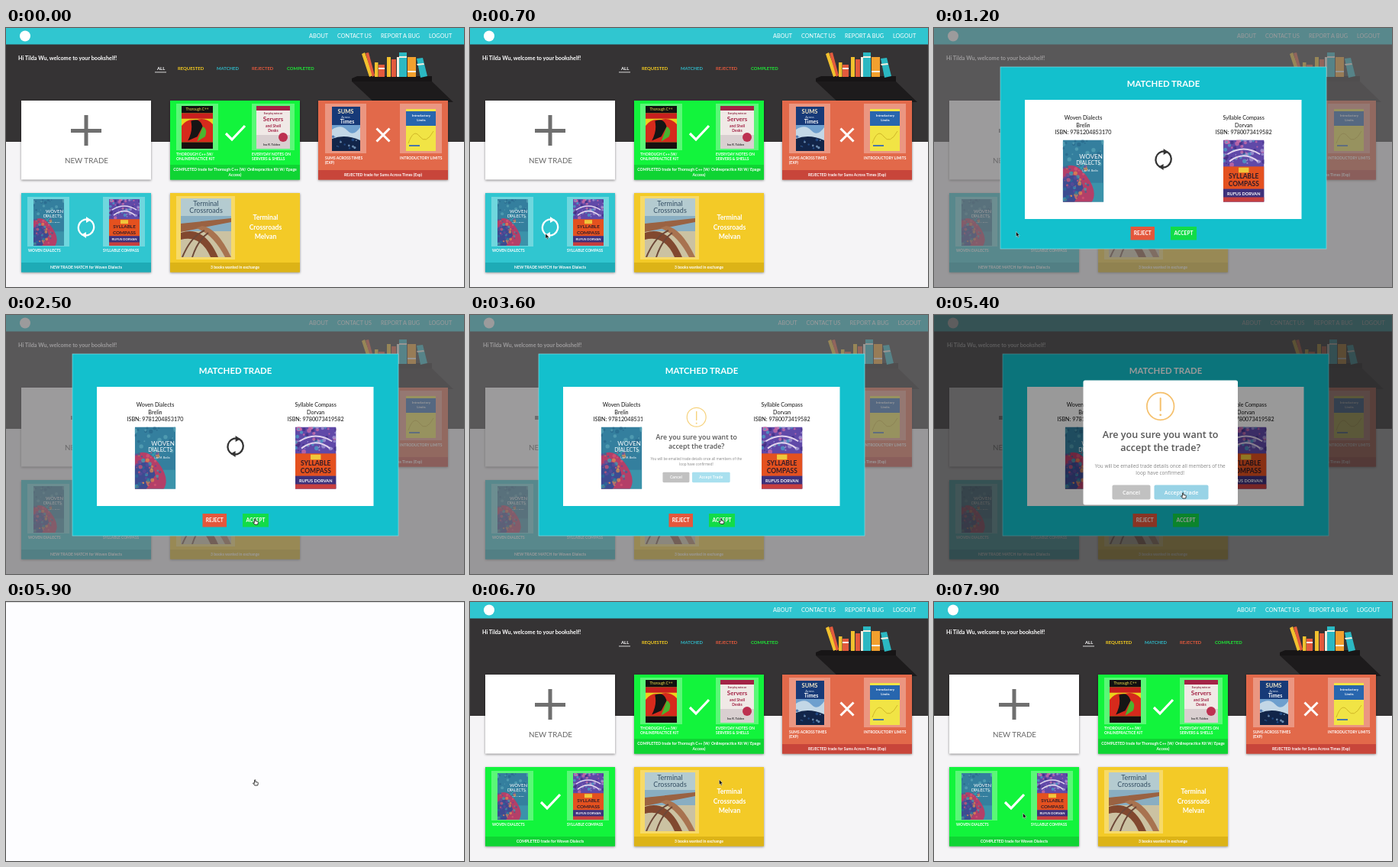
These frames come from a looping animation (600 by 339 pixels, 8000 ms). An HTML page:

```html
<!DOCTYPE html>
<html lang="en">
<head>
<meta charset="utf-8">
<title>Bookshelf trades</title>
<style>
html, body { margin: 0; height: 100%; overflow: hidden; background: #fdfdff; }
svg { display: block; width: 100vw; height: 100vh; }
text { font-family: Lato, "Open Sans", sans-serif; fill: #fff; white-space: pre; }
.b { font-weight: 700; }
.m { text-anchor: middle; }
.os { font-family: "Open Sans", "Noto Sans", sans-serif; }
.semi { font-weight: 600; }
.card { filter: drop-shadow(0 1px 1.5px rgba(0, 0, 0, .45)); }
</style>
</head>
<body>
<svg id="stage" viewBox="0 0 600 339"></svg>
<script>
const LOOP = 8000, STEP = 100;
const TEAL = '#30c6d0', GREEN = '#12f43c', RED = '#e2694a', YELLOW = '#f3ca27';

const rect = (x, y, w, h, fill, more = '') =>
  `<rect x="${x}" y="${y}" width="${w}" height="${h}" fill="${fill}" ${more}/>`;
const text = (x, y, size, str, cls = '', fill = '#fff') =>
  `<text x="${x}" y="${y}" font-size="${size}" class="${cls}" style="fill:${fill}">${str}</text>`;
const path = (d, fill, stroke = 'none', width = 1) =>
  `<path d="${d}" fill="${fill}" stroke="${stroke}" stroke-width="${width}"/>`;
const poly = (points, fill) => `<polygon points="${points}" fill="${fill}"/>`;
const group = (id, body) => `<g id="${id}">${body}</g>`;
const at = (x, y, body) => `<g transform="translate(${x} ${y})">${body}</g>`;

// Seeded speckle used to texture the covers
function specks(seed, n, colors, w, y0, y1, size) {
  let out = '';
  const rnd = () => (seed = seed * 16807 % 2147483647) / 2147483647;
  for (let i = 0; i < n; i++) {
    const r = size * (.4 + rnd());
    out += `<circle cx="${(rnd() * w).toFixed(1)}" cy="${(y0 + rnd() * (y1 - y0)).toFixed(1)}" r="${r.toFixed(1)}" fill="${colors[i % colors.length]}" opacity=".7"/>`;
  }
  return out;
}

const symbol = (id, w, h, body) =>
  `<symbol id="${id}" viewBox="0 0 ${w} ${h}" preserveAspectRatio="xMidYMid slice">${body}</symbol>`;
const cover = (id, x, y, w, h) => `<use href="#${id}" x="${x}" y="${y}" width="${w}" height="${h}"/>`;

const covers =
  symbol('cpp', 40, 56, rect(0, 0, 40, 56, '#e9d21c') + rect(0, 0, 40, 10, '#111') +
    text(20, 7, 4.6, 'Thorough C++', 'm', '#f3e14a') + rect(0, 10, 40, 7, '#c81f1f') +
    path('M0 26Q8 16 18 19Q30 14 40 24V47H0Z', '#d62a1c') +
    path('M12 20Q23 15 27 27L20 40 8 45Q15 32 12 20Z', '#151515') +
    path('M27 27Q34 30 30 40L20 46Z', '#49b52f') + rect(0, 47, 40, 9, '#181010')) +
  symbol('servers', 44, 56, rect(0, 0, 44, 56, '#f0e9e6') + rect(0, 0, 44, 6, '#a32346') +
    text(22, 10.5, 3, 'Everyday notes on', 'm b', '#8d2440') + text(22, 20, 8, 'Servers', 'm b', '#a32346') +
    text(22, 28, 5, 'and Shell', 'm b', '#a32346') + text(22, 34, 5, 'Desks', 'm b', '#a32346') +
    rect(0, 38, 44, 18, '#d9cfd0') + `<circle cx="35" cy="41" r="6" fill="#bd3050"/>` +
    text(20, 52, 4, 'Ivo R. Talden', 'm b', '#333')) +
  symbol('sums', 37, 58, rect(0, 0, 37, 58, '#173a78') + rect(0, 24, 37, 14, '#6e9fce') +
    path('M0 30Q12 22 20 31T37 27V45H0Z', '#c3d7e6') + path('M0 42Q17 35 37 44V58H0Z', '#122549') +
    text(18, 9, 7.5, 'SUMS', 'm b', '#f4e7c4') + text(18, 15, 4, 'Across', 'm', '#dce6f2') +
    text(20, 22, 7, 'Times', 'm b') + specks(9, 14, ['#91b6d8', '#28579a'], 37, 38, 55, 1.5)) +
  symbol('limits', 39, 55, rect(0, 0, 39, 55, '#f1e445') + rect(0, 3, 39, 19, '#2866ae') +
    text(20, 10, 4.3, 'Introductory', 'm b') + text(20, 16, 4.3, 'Limits', 'm b') +
    path('M3 45Q10 25 18 36T36 29', 'none', '#d0b727', 1) + rect(4, 47, 14, 2, '#4a78a8')) +
  symbol('woven', 40, 60.5, rect(0, 0, 40, 61, '#347f9e') + rect(0, 42, 40, 19, '#3b93aa') +
    path('M0 28Q11 19 23 35T28 61H0Z', '#b43f68') + path('M0 38Q16 28 20 47L11 61H0Z', '#3d4b91') +
    specks(31, 60, ['#d75876', '#35a7b5', '#5f4a9b', '#e6904d', '#286e9b'], 25, 25, 60, 1.5) +
    specks(55, 25, ['#5aa5b8', '#29678b'], 40, 0, 25, 1.7) +
    text(16, 18, 6, 'WOVEN') + text(13, 24, 5.2, 'DIALECTS') +
    text(19, 31, 2.6, 'Lise M. Brelin')) +
  symbol('compass', 40, 60.5, rect(0, 0, 40, 61, '#6049a8') +
    specks(17, 65, ['#a9a0d9', '#3e2d82', '#d46da5', '#49a5c9'], 40, 0, 25, 1.6) +
    path('M4 14Q20 4 36 14M6 21Q20 10 34 21', 'none', '#e3d4ee', 1.5) +
    rect(0, 26, 40, 22, '#e4511f') + rect(15, 27, 10, 5, '#f0c63b') +
    text(20, 38, 6.3, 'SYLLABLE', 'm b', '#301b28') + text(20, 45.5, 6.3, 'COMPASS', 'm b', '#301b28') +
    rect(0, 48, 40, 12.5, '#3d317b') + text(20, 54, 4.2, 'RUFUS DORVAN', 'm b') +
    rect(0, 56, 40, 5, '#c63f3f')) +
  symbol('cross', 66, 77, rect(0, 0, 66, 77, '#d5dfda') + rect(0, 0, 66, 23, '#b4cbd0') +
    text(33, 10, 9, 'Terminal', 'm', '#344e63') + text(33, 19, 9, 'Crossroads', 'm', '#344e63') +
    rect(0, 23, 66, 20, '#89aec2') + rect(0, 43, 66, 34, '#cbc2a2') +
    path('M0 33L66 26V31L0 44Z', '#9a6242') + path('M0 45Q31 35 49 77H39Q26 47 0 54Z', '#81482f') +
    path('M20 39Q42 46 58 77H66Q48 39 28 36Z', '#a87350') +
    path('M2 77Q13 50 31 42M15 77Q22 55 36 45', 'none', '#6d4838', 2));

const check = path('M-12 1L-4 9 13-9', 'none', '#fff', 3.2);
const cross = path('M-8.5-8.5L8.5 8.5M8.5-8.5L-8.5 8.5', 'none', '#fff', 3);
const halfSync = c => path('M-4.5 10A11 11 0 0 1 1.5-10.6', 'none', c, 2.3) + poly('0,-14 6.5,-9.8 0,-6', c);
const sync = c => halfSync(c) + `<g transform="rotate(180)">${halfSync(c)}</g>`;

function card(x, y, color, bar, lines, body) {
  const barH = lines.length > 1 ? 19.5 : 12.5;
  return at(x, y, `<g class="card">${rect(0, 0, 170, 103.5, color)}</g>` +
    (lines.length ? rect(0, 103.5 - barH, 170, barH, bar) : '') + body +
    lines.map((s, i) => text(85, 103.5 - barH + 8 + i * 7.3, 5.1, s, 'm b')).join(''));
}
const caption = (x, y, lines) => lines.map((s, i) => text(x, y + i * 6.2, 4.9, s, 'b')).join('');
const frame = (x, y, w, h) => rect(x, y, w, h, '#fff', 'opacity=".3"');

const tradeBody = icon => frame(8, 5, 55, 65) + cover('woven', 16, 8, 40, 61) +
  frame(107, 5, 55, 65) + cover('compass', 115, 8, 40, 61) +
  caption(9, 77, ['WOVEN DIALECTS']) + caption(107, 77, ['SYLLABLE COMPASS']) + at(85, 45, icon);

const cards =
  card(20, 95, '#fff', '', [], rect(65, 37, 40, 5, '#6f6f6f') + rect(82.5, 19, 5, 40, '#6f6f6f') +
    text(85.5, 82, 9.8, 'NEW TRADE', 'm', '#666')) +
  card(215, 95, GREEN, '#0fd433', ['COMPLETED trade for Thorough C++ (W/ Onlinepractice Kit W/ Epage', 'Access)'],
    frame(8, 4, 55, 61) + cover('cpp', 15, 7, 41, 56) + frame(107, 4, 56, 61) + cover('servers', 113, 7, 44, 56) +
    caption(8, 71.5, ['THOROUGH C++ (W/', 'ONLINEPRACTICE KIT']) +
    caption(107, 71.5, ['EVERYDAY NOTES ON', 'SERVERS &amp; SHELLS']) + at(85, 42, check)) +
  card(409, 95, RED, '#c8453a', ['REJECTED trade for Sums Across Times (Exp)'],
    frame(9, 4, 54, 65) + cover('sums', 18, 8, 37, 58) + frame(107, 4, 55, 65) + cover('limits', 115, 11, 39, 55) +
    caption(9, 77, ['SUMS ACROSS TIMES', '(EXP)']) + caption(107, 77, ['INTRODUCTORY LIMITS']) + at(85, 45, cross)) +
  group('matched', card(20, 216, TEAL, '#1eabb6', ['NEW TRADE MATCH for Woven Dialects'], tradeBody(sync('#fff')))) +
  group('completed', card(20, 216, GREEN, '#0fd433', ['COMPLETED trade for Woven Dialects'], tradeBody(check))) +
  card(215, 216, YELLOW, '#dcb317', ['3 books wanted in exchange'],
    frame(8, 4, 77, 83) + cover('cross', 14, 7, 66, 77) +
    ['Terminal', 'Crossroads', 'Melvan'].map((s, i) => text(125, 35 + i * 12.7, 8.7, s, 'm b')).join(''));

const shelf = poly('453,70 558,70 586,97 482,97', '#1d1b1c') + poly('453,66 460,63 558,63 558,70 453,70', '#171516') +
  poly('466,34 470,32 481,62 476,64', '#f2c12e') + poly('471,33 475,32 483,62 480,64', '#e35a3d') +
  rect(483, 45, 4.5, 19, '#f2c12e') + rect(488, 48, 8, 16, '#e35a3d') + rect(488, 52, 8, 2, '#fff') +
  rect(499, 38, 5, 26, '#f2c12e') + rect(505, 41, 6, 23, '#e35a3d') + rect(512, 38, 3, 26, '#f5eee0') +
  rect(515, 32, 10, 32, '#2bb8c2') + rect(515, 37, 10, 2, '#f5eee0') +
  rect(526, 38, 11, 26, '#f2a02e') + rect(526, 56, 11, 2, '#f5eee0') +
  poly('538,40 546,39 552,63 543,65', '#2bb8c2') + poly('538,47 547,46 548,48 539,49', '#f5eee0');

const filters = [[198, 'ALL', '#fff'], [225, 'REQUESTED', '#f6cc1f'], [276, 'MATCHED', '#2fb9c8'],
  [322, 'REJECTED', '#e2593c'], [368, 'COMPLETED', '#1eea36']];
const menu = [[397, 'ABOUT'], [434, 'CONTACT US'], [491, 'REPORT A BUG'], [554, 'LOGOUT']];

const page = rect(0, 0, 600, 339, '#f5f4f6') + rect(0, 21, 600, 128, '#353334') + rect(0, 0, 600, 21.5, TEAL) +
  `<circle cx="25" cy="10.5" r="7" fill="#fff"/>` +
  group('menu', menu.map(([x, s]) => text(x, 13.4, 7.3, s)).join('')) +
  group('hello', text(16, 42.2, 7.2, 'Hi Tilda Wu, welcome to your bookshelf!', 'b')) +
  filters.map(([x, s, c]) => text(x, 55, 5.9, s, 'b', c)).join('') + rect(195, 57.5, 15, .8, '#fff') +
  group('shelf', shelf) + cards;

const book = (x, id, lines) => lines.map((s, i) => text(x, 120.3 + i * 9.5, 7.2, s, 'm', '#111')).join('') +
  cover(id, x - 26.7, 146.5, 53.5, 81);
const modal = rect(87, 51, 427, 238, '#13c0cd', 'stroke="#7fdbe2" stroke-width=".7"') +
  text(300.5, 77, 11.4, 'MATCHED TRADE', 'm b') + rect(119, 94, 362.5, 156, '#fff') +
  book(195.5, 'woven', ['Woven Dialects', 'Brelin', 'ISBN: 9781204853170']) +
  book(405.7, 'compass', ['Syllable Compass', 'Dorvan', 'ISBN: 9780073419582']) +
  at(300.6, 172, sync('#333')) +
  rect(257.5, 260, 31.5, 17.5, '#e4573c') + text(273.3, 271, 6.6, 'REJECT', 'm b') +
  rect(310, 260, 34, 17.5, '#12dc48') + text(327, 271, 6.6, 'ACCEPT', 'm b');

const alertBox = rect(195.5, 85.5, 202.5, 163, '#fff', 'rx="2.5"') +
  group('warn', `<circle cx="296.7" cy="119.5" r="17.8" fill="none" stroke="currentColor" stroke-width="1.7"/>` +
    rect(295.7, 108, 2, 18, 'currentColor', 'rx="1"') + `<circle cx="296.7" cy="130.8" r="1.4" fill="currentColor"/>`) +
  text(296.7, 161.3, 12.6, 'Are you sure you want to', 'm os semi', '#575757') +
  text(296.7, 178.3, 12.6, 'accept the trade?', 'm os semi', '#575757') +
  text(296.2, 200.3, 6.45, 'You will be emailed trade details once all members of the', 'm os', '#858585') +
  text(296.2, 209.3, 6.45, 'loop have confirmed!', 'm os', '#858585') +
  rect(233.5, 222.5, 50, 19, '#c1c1c1', 'rx="2"') + text(258.5, 234.6, 7.2, 'Cancel', 'm os semi') +
  group('confirm', rect(288.5, 222.5, 71, 19, 'currentColor', 'rx="2"')) +
  text(324, 234.6, 7.2, 'Accept Trade', 'm os semi');

const arrow = path('M0 0V6.6L1.5 5.3 2.6 7.8 3.7 7.3 2.6 5H4.7Z', '#111', '#fff', .4);
const hand = path('M-1 4V.6Q-.3-.4.4.6V3L3.4 3.6Q4 3.8 3.8 5L3.2 7.5H-.6L-3 4.6Q-2.6 3.5-1 5Z', '#fff', '#222', .9);

document.getElementById('stage').innerHTML = `<defs>${covers}</defs>` + group('page', page) +
  rect(0, 0, 600, 339, '#6c6a6c', 'id="dim"') + group('modal', modal) +
  rect(0, 0, 600, 339, '#000', 'id="shade"') + group('alert', alertBox) +
  group('blank', rect(0, 0, 600, 339, '#fdfdff') + rect(0, 0, 600, 1, '#dedee0')) +
  group('cursor', group('arrow', arrow) + group('hand', hand));

const el = id => document.getElementById(id);
const show = (id, on) => el(id).setAttribute('display', on ? 'inline' : 'none');
const opacity = (id, v) => el(id).setAttribute('opacity', v);
const move = (id, x, y = 0) => el(id).setAttribute('transform', `translate(${x} ${y})`);
const clamp = v => Math.max(0, Math.min(1, v));
const ease = v => v * v * (3 - 2 * v);

// Interpolates rows of [time, ...values]
function track(rows, t, curve = v => v) {
  let i = 0;
  while (i < rows.length - 2 && t >= rows[i + 1][0]) i++;
  const [a, b] = [rows[i], rows[i + 1]];
  const k = curve(clamp((t - a[0]) / (b[0] - a[0])));
  return a.slice(1).map((v, j) => v + (b[j + 1] - v) * k);
}

const pointer = [[200, -8, 300], [800, 107.5, 266.5], [1900, 107.5, 266.5], [2300, 328, 266], [2600, 326, 267],
  [3200, 329, 266], [4500, 329, 266], [5100, 326.5, 232.5], [7100, 326.5, 232.5], [7800, 116.5, 276.3]];
const pop = [[3600, .7], [3735, 1.05], [3840, .95], [3900, 1]];

function draw(t) {
  const reloaded = t >= 6500, alerted = t >= 3600 && t < 5700;
  const shift = alerted ? 1 : 0;
  move('menu', 6.5 * shift);
  move('hello', shift);
  move('shelf', 3 * shift);
  show('matched', !reloaded);
  show('completed', reloaded);

  const open = t < 5700 ? ease(clamp((t - 900) / 300)) : 0;
  opacity('dim', .67 * open);
  opacity('modal', open);
  move('modal', 3 * shift, -40 * (1 - open));

  show('alert', alerted);
  opacity('shade', alerted ? .4 * clamp((t - 3600) / 100) : 0);
  const [s] = track(pop, t);
  el('alert').setAttribute('transform', `translate(296.7 167) scale(${s}) translate(-296.7 -167)`);
  const pulse = .5 - .5 * Math.cos((t - 3600) / 750 * Math.PI);
  el('warn').style.color = `rgb(${246 - 4 * pulse} ${210 - 52 * pulse} ${125 - 50 * pulse})`;
  el('confirm').style.color = t >= 5000 ? '#98d3e6' : '#a9e0ef';

  show('blank', t >= 5700 && !reloaded);
  move('cursor', ...track(pointer, t, ease));
  const pointing = t >= 2300 && t < 4500 || t >= 5000 && t < 6500;
  show('hand', pointing);
  show('arrow', !pointing);
}

const start = performance.now();
function tick() {
  const t = (performance.now() - start) % LOOP;
  draw(Math.floor(t / STEP) * STEP);
  requestAnimationFrame(tick);
}
tick();
</script>
</body>
</html>
```
